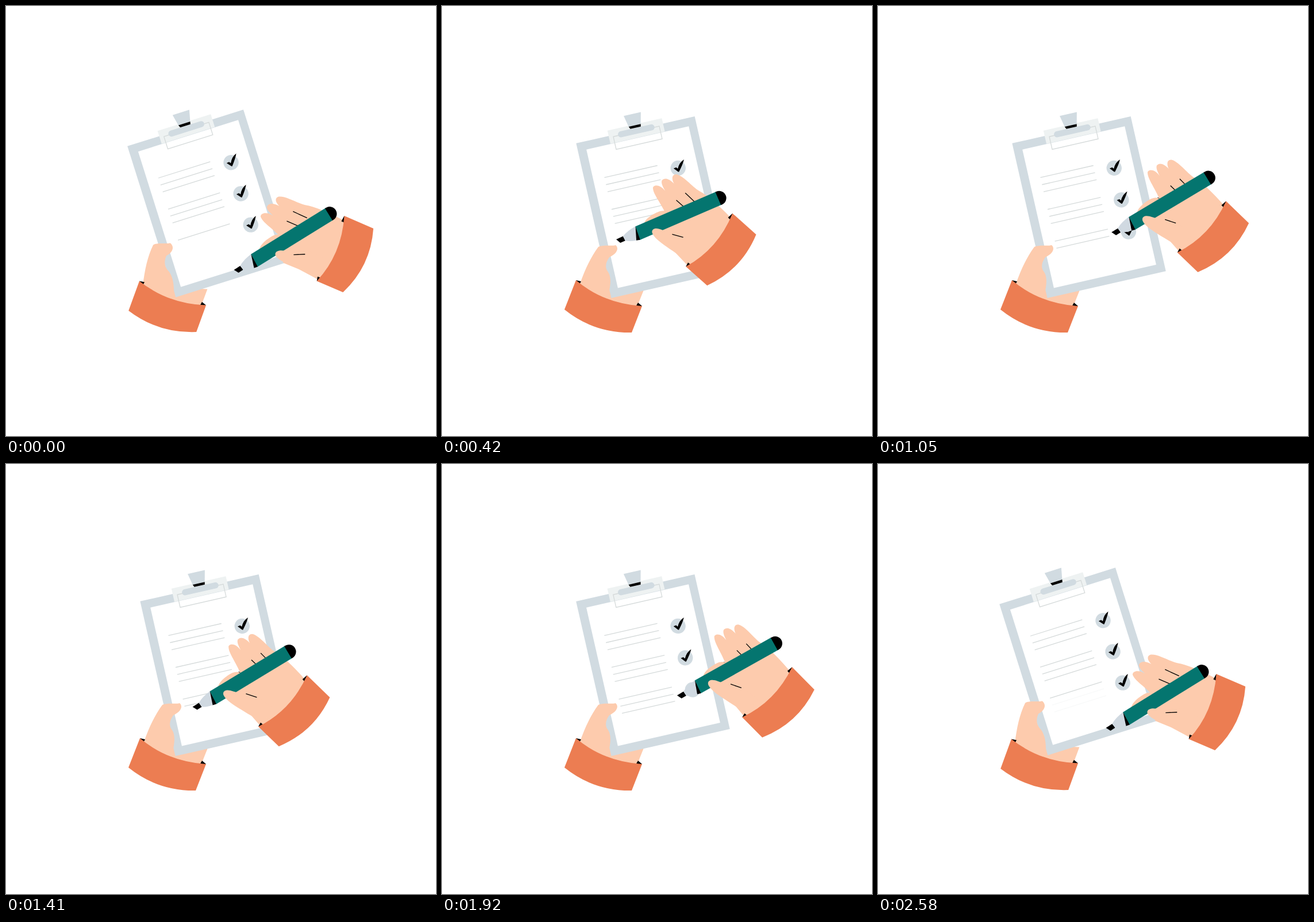
Recreate the animation shown at these times as an HTML page. Size 748 by 748 pixels, loop 2610 ms.

```html
<!DOCTYPE html>
<html lang="en">
<head>
<meta charset="utf-8">
<title>Checklist</title>
<style>
  html, body { margin: 0; height: 100%; overflow: hidden; background: #fff; }
  svg { display: block; width: 100vw; height: 100vh; }
  .board { fill: #d1dbe1; }
  .skin { fill: #fdcbad; }
  .cuff { fill: #ec7d52; }
  .line { stroke: #d5dada; stroke-width: 1.3; fill: none; }
  .crease { stroke: #000; stroke-width: 1.3; fill: none; }
</style>
</head>
<body>
<svg viewBox="0 0 748 748">
  <defs>
    <g id="item">
      <circle class="board" r="13.2"/>
      <path d="M-7.7-1.3L-3-2L-.8 1Q4-9 13.3-12.3Q9.5-4.5 0 6.7L-1.2 6.5Z"/>
    </g>
  </defs>

  <path id="palm" class="skin" d="M240 485L262 440L295 490L351 494L339 524L280 520Z"/>

  <g id="clipboard">
    <path class="board" d="M0-276H211.5V0H0Z"/>
    <path fill="#fff" d="M15-261.5H197.5V-14.5H15Z"/>
    <path fill="#eef2f2" d="M58-285.5h97v23.5h-97Z"/>
    <path class="line" d="M65.6-273h82v22.7h-82Z"/>
    <path d="M79.5-274H134" stroke="#d1dbe1" stroke-width="10.5" stroke-linecap="round"/>
    <path class="board" d="M91.2-304H121.7L117-284H95.5Z"/>
    <path d="M95.5-284H117L116-279.5H97.5Z"/>
    <g id="rows"></g>
  </g>

  <path id="leftThumb" class="skin" d="M239 486C248 460 258 438 272 419C280 415 295 418 302 416
    C309 422 303 432 291 437C286 444 283 452 287 460C294 468 294 480 291 495L292 512L240 490Z"/>
  <g id="leftCuff">
    <path d="M233 477L242 479L238 486ZM341 516L348 522L337 523Z"/>
    <path class="cuff" d="M233 477L213 528Q264 569 330 568L348 522Q282 518 233 477Z"/>
  </g>

  <g id="hand">
    <path class="skin" d="M604 347Q570 309 549 297C538 290 522 269 510 267C502 267 502 276 506 283
      C497 273 489 272 485 277C483 282 487 289 490 295C482 284 471 283 469 289
      C469 300 480 313 489 333L485 350L478 378L500 398L532 434Q580 400 604 347Z"/>
    <path class="crease" d="M525 300L544 319M509 312L526 328M487 333L495 339"/>
    <path d="M606 338L598 345L605 352ZM522 428L526 421L533 427Z"/>
    <path class="cuff" d="M606 338L646 376Q619 436 558 462L522 428Q579 399 606 338Z"/>
  </g>

  <g id="pen">
    <path class="skin" d="M452 364C448 356 460 344 472 337C480 332 489 332 492 337L485 362Z"/>
    <g transform="translate(407 394) rotate(-31.3)">
      <path d="M0 0L13-.3L13.7 8.3L4.2 8.4Z"/>
      <path fill="#d0d9e1" d="M13-.3Q24-6.5 39.7-7.5L32 15.6Q20 13 13.7 8.3Z"/>
      <path fill="#04756f" d="M39.5-7.5H192V17.2H37.5Z"/>
      <path d="M39.7-7.5L38 17.2L31.5 15.6ZM191-7.5h2a12.35 12.35 0 0 1 0 24.7h-2Z"/>
    </g>
  </g>

  <g id="grip">
    <path id="thumb" class="skin" d="M461 373C459 365 468 363 478 367C490 371 505 371 515 372L548 395L529 422C505 404 467 388 461 373Z"/>
    <path class="crease" d="M500 371L519 377"/>
  </g>
</svg>

<script>
const LOOP = 2610;
const LINE = { from: 34.7, to: 129.3 };
const $ = id => document.getElementById(id);
const mix = (a, b, k) => a + (b - a) * k;
const smooth = x => x * x * (3 - 2 * x);
const span = (t, a, b) => Math.min(1, Math.max(0, (t - a) / (b - a)));
const move = (el, transform) => el.setAttribute('transform', transform);

// each stroke writes one line, which fades later, possibly after the loop restarts
const strokes = [
  { start: 420, end: 570, fade: LOOP + 30, turn: -1.8, twist: 8 },
  { start: 790, end: 1060, fade: 2490, turn: 8, twist: 8 },
  { start: 1530, end: 1905, fade: 2490, turn: .5, twist: 0 }
];

// x, y: pen tip; turn: hand; twist: pen; tilt: board
const rest = { x: 396.5, y: 459, turn: -20.2, twist: -.5, tilt: 1 };
const poses = [
  { ...rest, t: 0 },
  ...strokes.flatMap(({ start, end, turn, twist }, i) => [
    { t: start, x: 303 + 3 * i, y: 406 + 11 * i, turn, twist, tilt: 0 },
    { t: end, x: 404 + 2.5 * i, y: 385 + 8.5 * i, turn: i * i / 2, twist: i * i / 2, tilt: 0 }
  ]),
  { ...rest, t: 2220, turn: -19.3, tilt: .97 },
  { ...rest, t: LOOP }
];

function poseAt(t) {
  const i = poses.findIndex(p => p.t > t);
  const from = poses[i - 1], to = poses[i], pose = {};
  const k = smooth(span(t, from.t, to.t));
  for (const key in rest) pose[key] = mix(from[key], to[key], k);
  return pose;
}

function add(name, attrs) {
  const el = document.createElementNS('http://www.w3.org/2000/svg', name);
  for (const key in attrs) el.setAttribute(key, attrs[key]);
  return $('rows').appendChild(el);
}

const lines = [];
for (let group = 0; group < 3; group++) {
  add('use', { href: '#item', x: 163.4, y: -194.7 + group * 56.8 });
  for (let row = 0; row < 3; row++) {
    const y = -207 + group * 56.7 + row * 12.6;
    lines.push(add('line', { class: 'line', x1: LINE.from, x2: LINE.to, y1: y, y2: y }));
  }
}
const written = lines.slice(-3);

function draw(t) {
  const { x, y, turn, twist, tilt } = poseAt(t);

  move($('clipboard'), `translate(${294.5 - .3 * tilt} ${508 - .9 * tilt}) rotate(${-12.8 - 4.7 * tilt})`);
  for (const id of ['leftCuff', 'palm']) move($(id), `rotate(${-1.4 * tilt} 290 520)`);
  move($('leftThumb'), `translate(0 490) skewX(${12 * tilt}) scale(1 ${1 + .05 * tilt}) translate(0 -490)`);

  // the cuff follows the tip at an angle halfway between hand and pen
  const angle = (turn + twist) / 2 * Math.PI / 180 - .2743;
  const reach = 206.7 * (1 - turn / 600);
  const handMove = `translate(${x + reach * Math.cos(angle)} ${y + reach * Math.sin(angle)}) rotate(${turn}) translate(-606 -338)`;
  move($('hand'), handMove);
  move($('grip'), handMove);
  move($('thumb'), `rotate(${(twist - turn) / 2} 528 420)`);
  move($('pen'), `translate(${x} ${y}) rotate(${twist}) translate(-407 -394)`);

  written.forEach((line, i) => {
    const { start, end, fade } = strokes[i];
    const time = t < start ? t + LOOP : t;
    line.setAttribute('x2', mix(LINE.from, LINE.to, smooth(span(time, start, end))));
    line.setAttribute('opacity', 1 - span(time, fade, fade + 110));
  });
}

const begin = performance.now();
function frame() {
  draw((performance.now() - begin) % LOOP);
  requestAnimationFrame(frame);
}
frame();
</script>
</body>
</html>
```
